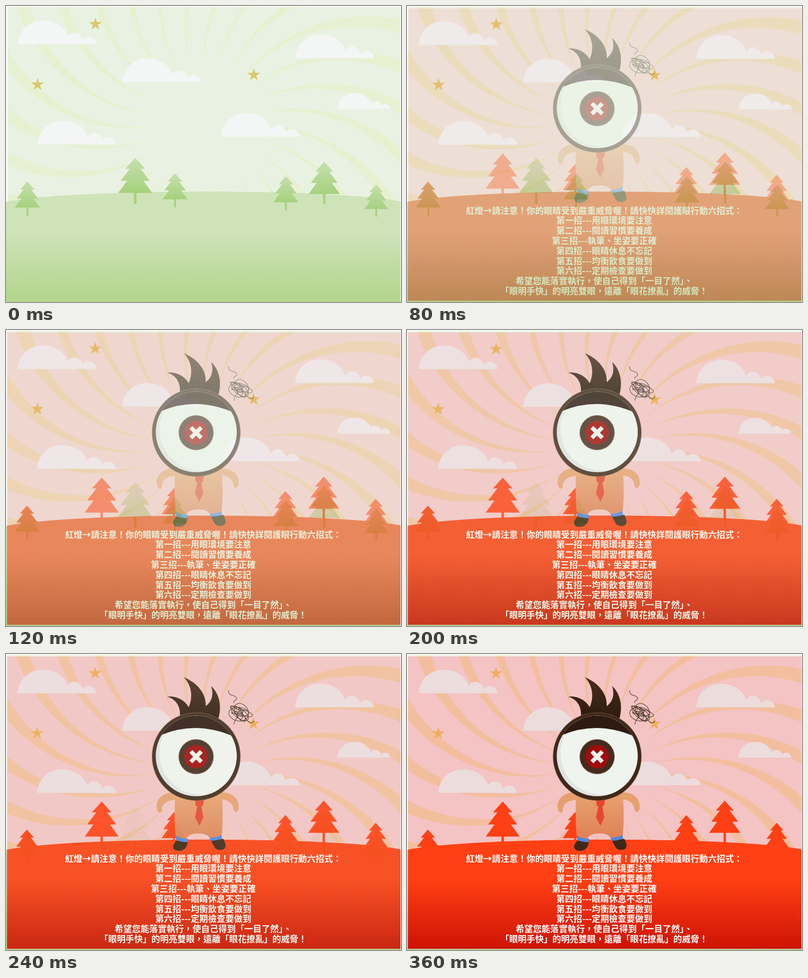
An HTML page with a canvas that plays this animation: 813 px wide and 612 px high, repeating every 800 ms.

```html
<!DOCTYPE html>
<html lang="zh-Hant">
<head>
<meta charset="utf-8">
<style>
html, body { margin: 0; width: 100%; height: 100%; overflow: hidden; background: #fff; }
canvas { display: block; }
</style>
</head>
<body>
<canvas id="stage" width="813" height="612"></canvas>
<script>
const W = 813, H = 612, LOOP = 800, STEP = 40, STEPS = 9;
const TAU = Math.PI * 2, RAYS = 27;

const CLOUDS = [[25, 30, 1], [240, 108, 1], [65, 237, 1], [443, 221, 1], [596, 59, 1], [683, 180, .67]];
const STARS = [[184, 37.5], [65, 162.5], [510, 142.5]];
const CLOUD = new Path2D('M0 49C1 26 17 0 52 0C78 0 97 15 103 34C107 22 128 20 134 40C140 30 161 32 162 49Z');
const HILL = new Path2D('M0 405C140 377 672 377 812 404V612H0Z');

const LINES = [
  '紅燈→請注意！你的眼睛受到嚴重威脅喔！請快快詳閱護眼行動六招式：',
  '第一招---用眼環境要注意',
  '第二招---閱讀習慣要養成',
  '第三招---執筆、坐姿要正確',
  '第四招---眼睛休息不忘記',
  '第五招---均衡飲食要做到',
  '第六招---定期檢查要做到',
  '希望您能落實執行，使自己得到「一目了然」、',
  '「眼明手快」的明亮雙眼，遠離「眼花撩亂」的威脅！'
];

const CALM = {
  sky: '#e9f2e2', ray: '#e7f1d2', cloud: '#f4f5f5', star: '#d9c86e',
  hill: ['#cfe3b9', '#b2d58b'], tree: ['#c6dfae', '#a6d17c'],
  trees: [[266, 314, 1], [348, 346, .74], [576, 352, .74], [655, 322, .92], [762, 369, .7], [44, 363, .74]]
};
const ALERT = {
  sky: '#f4c3c3', ray: '#f3be9d', cloud: '#ecdcdc', star: '#f0af5f',
  hill: ['#ff4014', '#cd1205'], tree: ['#ff4014', '#ff4014'],
  trees: [[197, 305, 1], [346, 327, .74], [575, 333, .74], [654, 303, .92], [761, 349, .7], [43, 363, .74]]
};

function layer(paint) {
  const canvas = document.createElement('canvas');
  canvas.width = W;
  canvas.height = H;
  paint(canvas.getContext('2d'));
  return canvas;
}

function vertical(c, y0, y1, [top, bottom]) {
  const g = c.createLinearGradient(0, y0, 0, y1);
  g.addColorStop(0, top);
  g.addColorStop(1, bottom);
  return g;
}

function fill(c, style, path) {
  c.fillStyle = style;
  c.fill(typeof path === 'string' ? new Path2D(path) : path);
}

function disc(c, style, x, y, r) {
  const path = new Path2D();
  path.arc(x, y, r, 0, TAU);
  fill(c, style, path);
}

// Two arcs leave one tip with slightly different heading and bend.
function drawRay(c, angle) {
  const edge = side => {
    const heading = -.06 + side * .03, bend = 1 / 320 + side * 8e-5, points = [];
    for (let s = 0; s <= 620; s += 10) {
      const h = heading + bend * s;
      points.push([103 + (Math.sin(h) - Math.sin(heading)) / bend,
                   (Math.cos(heading) - Math.cos(h)) / bend]);
    }
    return points;
  };
  c.save();
  c.translate(408, 242);
  c.rotate(angle);
  c.beginPath();
  [...edge(-1), ...edge(1).reverse()].forEach(p => c.lineTo(...p));
  c.fill();
  c.restore();
}

function drawSky(c, theme) {
  c.fillStyle = theme.ray;
  for (let i = 0; i < RAYS; i++) drawRay(c, 3.08 + i * TAU / RAYS);
  for (const [x, y, size] of CLOUDS) {
    c.save();
    c.translate(x, y);
    c.scale(size, size);
    fill(c, theme.cloud, CLOUD);
    c.restore();
  }
  c.fillStyle = theme.star;
  for (const [x, y] of STARS) {
    c.beginPath();
    for (let i = 0; i < 10; i++) {
      const r = i % 2 ? 5.3 : 14, a = i * TAU / 10 - TAU / 4;
      c.lineTo(x + r * Math.cos(a), y + r * Math.sin(a));
    }
    c.fill();
  }
}

function drawTrees(c, theme) {
  const shape = new Path2D('M0 0L20 22.5H11L30 47.5H17L35 72.5H2.6V95H-2.6V72.5H-35L-17 47.5H-30L-11 22.5H-20Z');
  for (const [x, y, size] of theme.trees) {
    c.save();
    c.translate(x, y);
    c.scale(size, size);
    fill(c, vertical(c, 0, 73, theme.tree), shape);
    c.restore();
  }
}

function drawHill(c, theme) {
  fill(c, vertical(c, 465, 612, theme.hill), HILL);
}

function drawBody(c) {
  const skin = vertical(c, 290, 385, ['#e8a26f', '#de8055']);
  fill(c, '#e69f6e', 'M352 286C326 284 309 298 310 316C311 331 321 331 321 321C322 309 332 302 352 301Z');
  fill(c, '#e69f6e', 'M440 286C466 285 480 299 479 317C478 330 469 329 468 320C467 308 457 301 440 300Z');
  fill(c, '#402819', 'M350 386L374 389C373 399 367 407 356 407C346 407 342 402 345 394Z');
  fill(c, '#402819', 'M422 386L447 382C451 389 454 397 450 402C445 407 435 406 430 401Z');
  fill(c, '#4b87e6', 'M350 373Q361 381 375 382L373 389Q359 389 350 384Z');
  fill(c, '#4b87e6', 'M419 380Q434 379 444 373V382Q434 386 421 386Z');
  fill(c, skin, 'M348 290H444Q448 338 444 374Q433 380 419 380Q414 371 396 371Q376 371 371 382Q357 381 349 375Q346 338 348 290Z');
  fill(c, '#e6462d', 'M389 298H408L406 312Q404 315 402 315L406 338L398 355L389 338L394 315Q391 315 390 312Z');
}

function drawHead(c) {
  fill(c, vertical(c, 50, 130, ['#4a2d1c', '#2d1b10']),
    'M358 131C360 108 350 94 332 88C350 86 368 95 376 110C385 90 383 66 366 48C393 59 413 82 411 108C424 98 428 84 422 66C441 84 444 110 437 135Z');
  disc(c, '#7a5c47', 391.5, 212, 91.3);
  disc(c, '#402819', 391.5, 212, 90.4);
  c.save();
  c.beginPath();
  c.arc(391.5, 210.7, 83.3, 0, TAU);
  c.clip();
  c.fillStyle = '#e0e4e2';
  c.fillRect(300, 120, 184, 184);
  disc(c, '#f0f4ee', 402, 205, 86);
  fill(c, '#2d1a10', 'M300 120H484V176L467 170Q391 137 318 168L300 178Z');
  c.restore();
  disc(c, '#8b6b58', 391.3, 212.3, 36.3);
  disc(c, '#452b1f', 391.3, 212.3, 35.2);
  disc(c, '#a00c0a', 391.3, 212.3, 24.3);
  c.strokeStyle = '#f0f4ee';
  c.lineWidth = 8.5;
  c.stroke(new Path2D('M380.5 201.5L402 223M402 201.5L380.5 223'));
}

function drawScribble(c) {
  c.strokeStyle = '#3f3024';
  c.lineWidth = 1.1;
  c.lineJoin = 'round';
  c.stroke(new Path2D('M458 75C458 89 470 83 474 90C478 97 467 94 469 101'));
  c.beginPath();
  for (let t = 0; t <= 1; t += .004) {
    const a = t * TAU * 8 - 2.3, r = 19 - 10 * t;
    c.lineTo(482 - 3 * t + r * Math.cos(a) + 7 * Math.sin(t * 31),
             121 + 2 * t + r * .75 * Math.sin(a + .5) + 7 * Math.cos(t * 37));
  }
  c.stroke();
  c.stroke(new Path2D('M469 146Q470 137 478 129M490 127C496 139 506 148 510 138'));
}

function drawText(c) {
  c.font = 'bold 17.8px "Noto Sans CJK TC", "Noto Sans CJK", sans-serif';
  c.textAlign = 'center';
  c.textBaseline = 'alphabetic';
  c.fillStyle = '#fff';
  LINES.forEach((line, i) => c.fillText(line, 406, 429.5 + i * 20.8));
}

const calm = layer(c => {
  c.fillStyle = '#fff';
  c.fillRect(0, 0, W, H);
  c.save();
  c.beginPath();
  c.rect(3, 2, 809, 610);
  c.clip();
  c.fillStyle = CALM.sky;
  c.fillRect(0, 0, W, H);
  drawSky(c, CALM);
  c.restore();
  drawHill(c, CALM);
  drawTrees(c, CALM);
});

const alert = layer(c => {
  c.beginPath();
  c.rect(2, 5, 810, 604.5);
  c.clip();
  c.fillStyle = ALERT.sky;
  c.fillRect(0, 0, W, H);
  c.save();
  c.translate(-.8, 2.8);
  c.scale(1, .994);
  drawSky(c, ALERT);
  c.restore();
  drawTrees(c, ALERT);
  drawHill(c, ALERT);
  drawBody(c);
  drawHead(c);
  drawScribble(c);
  drawText(c);
});

const stage = document.getElementById('stage').getContext('2d');
const start = performance.now();

function render(now) {
  const time = Math.max(0, now - start) % LOOP;
  const progress = Math.min(STEPS, Math.floor(time / STEP)) / STEPS;
  stage.globalAlpha = 1;
  stage.drawImage(calm, 0, 0);
  stage.globalAlpha = 1 - (1 - progress) ** 2;
  stage.drawImage(alert, 0, 0);
  requestAnimationFrame(render);
}
render(start);
</script>
</body>
</html>
```
